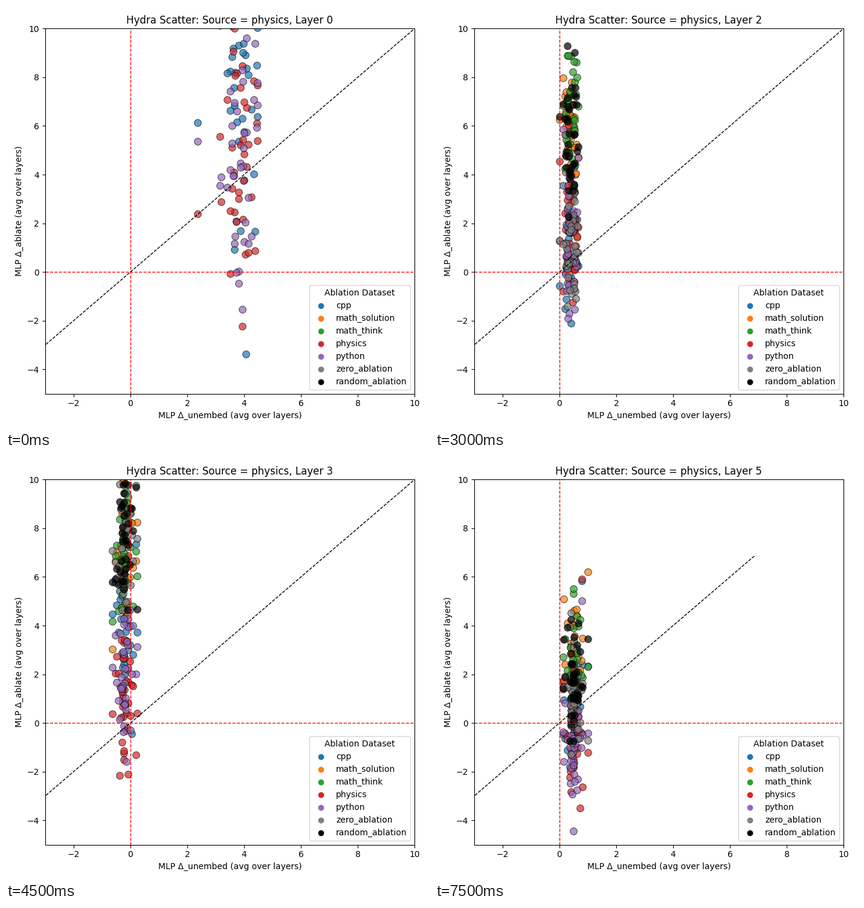
A matplotlib script that plays this animation: 700 by 700 pixels, repeating every 8 s.

```python
import numpy as np
import matplotlib.pyplot as plt
from matplotlib.animation import FuncAnimation

COLORS = {"cpp": "tab:blue", "math_solution": "tab:orange",
          "math_think": "tab:green", "physics": "tab:red",
          "python": "tab:purple", "zero_ablation": "gray",
          "random_ablation": "black"}
SAMPLES = 37
STEP = 500          # ms per frame
HOLD = 3            # frames per layer
FRAMES = 16
OFF = np.nan        # dataset out of view

# Per layer: x (lowest, centre, spread, highest), y spread, y centre by dataset
CLOUDS = [
    ((2.36, 3.88, .33, 4.46), 2.8, (7.5, OFF, OFF, 4.6, 4.4, OFF, OFF)),
    ((-.22, 1.1, .33, 2.14), 1.25, (2.5, 6.5, 6.7, 1.9, 1.7, OFF, OFF)),
    ((0, .38, .13, .67), 1.6, (1.5, 5.5, 6.6, 1.7, 1, 1.1, 5.6)),
    ((-.64, -.2, .15, .24), 1.5, (4.2, 6.8, 7.1, .9, 2, 7.2, 7.5)),
    ((-1.78, -1.37, .13, -.96), 1.25, (2.3, 4.6, 5.2, -.1, .3, 4.2, 5.7)),
    ((.13, .5, .14, 1.01), 1.25, (.5, 2.8, 2.3, -.5, -.9, 1.2, 1.8)),
]

# Lone points far from their cloud: (layer, dataset) -> positions
LONE = {
    (0, "cpp"): [(4.07, -3.38)],
    (1, "zero_ablation"): [(-.2, 9.4), (2.14, 7.42)],
    (1, "random_ablation"): [(-.2, 8.98), (2.14, 7.86)],
    (5, "cpp"): [(.78, 5.85)],
    (5, "physics"): [(.78, 5.92)],
    (5, "python"): [(.78, 5.02)],
}


def scores(rng):
    """Normal scores with mean 0 and spread 1."""
    z = rng.normal(size=SAMPLES)
    return (z - z.mean()) / z.std()


def make_layer(layer):
    """Point sets by dataset; all datasets share the samples' x values."""
    rng = np.random.default_rng(layer + 20)
    (low, mid, spread, high), y_spread, centres = CLOUDS[layer]
    x = np.clip(mid + spread * scores(rng), low, high)
    x[:2] = low, high
    sets = []
    for name, centre in zip(COLORS, centres):
        points = np.column_stack((x, centre + y_spread * scores(rng)))
        points = points[~np.isnan(points[:, 1])]
        lone = np.reshape(LONE.get((layer, name), []), (-1, 2))
        sets.append(np.vstack((points, lone)))
    return sets


layers = [make_layer(k) for k in range(len(CLOUDS))]

plt.rcParams["font.family"] = "DejaVu Sans"
fig, ax = plt.subplots(figsize=(7, 7), dpi=100)
dots = [ax.scatter([], [], s=70, color=c, alpha=.7, edgecolor="black",
                   linewidth=.67) for c in COLORS.values()]
ax.axhline(0, color="red", ls="--", lw=1)
ax.axvline(0, color="red", ls="--", lw=1)
diagonal, = ax.plot([], [], "k--", lw=1)
for name, c in COLORS.items():
    ax.scatter([], [], color=c, label=name)
ax.set(xlim=(-3, 10), ylim=(-5, 10),
       xlabel="MLP Δ_unembed (avg over layers)",
       ylabel="MLP Δ_ablate (avg over layers)")
title = ax.set_title("Hydra Scatter: Source = physics, Layer 0")
ax.legend(title="Ablation Dataset", loc="lower right")
fig.tight_layout()


def update(frame):
    layer = frame // HOLD
    for dot, points in zip(dots, layers[layer]):
        dot.set_offsets(points)
    # the last cloud is low enough for its diagonal to end inside the axes
    end = 6.86 if layer == len(layers) - 1 else 12
    diagonal.set_data([-5, end], [-5, end])
    title.set_text(f"Hydra Scatter: Source = physics, Layer {layer}")
    return [*dots, diagonal, title]


anim = FuncAnimation(fig, update, frames=FRAMES, interval=STEP,
                     init_func=lambda: update(0), repeat=True, repeat_delay=0)
plt.show()
```
